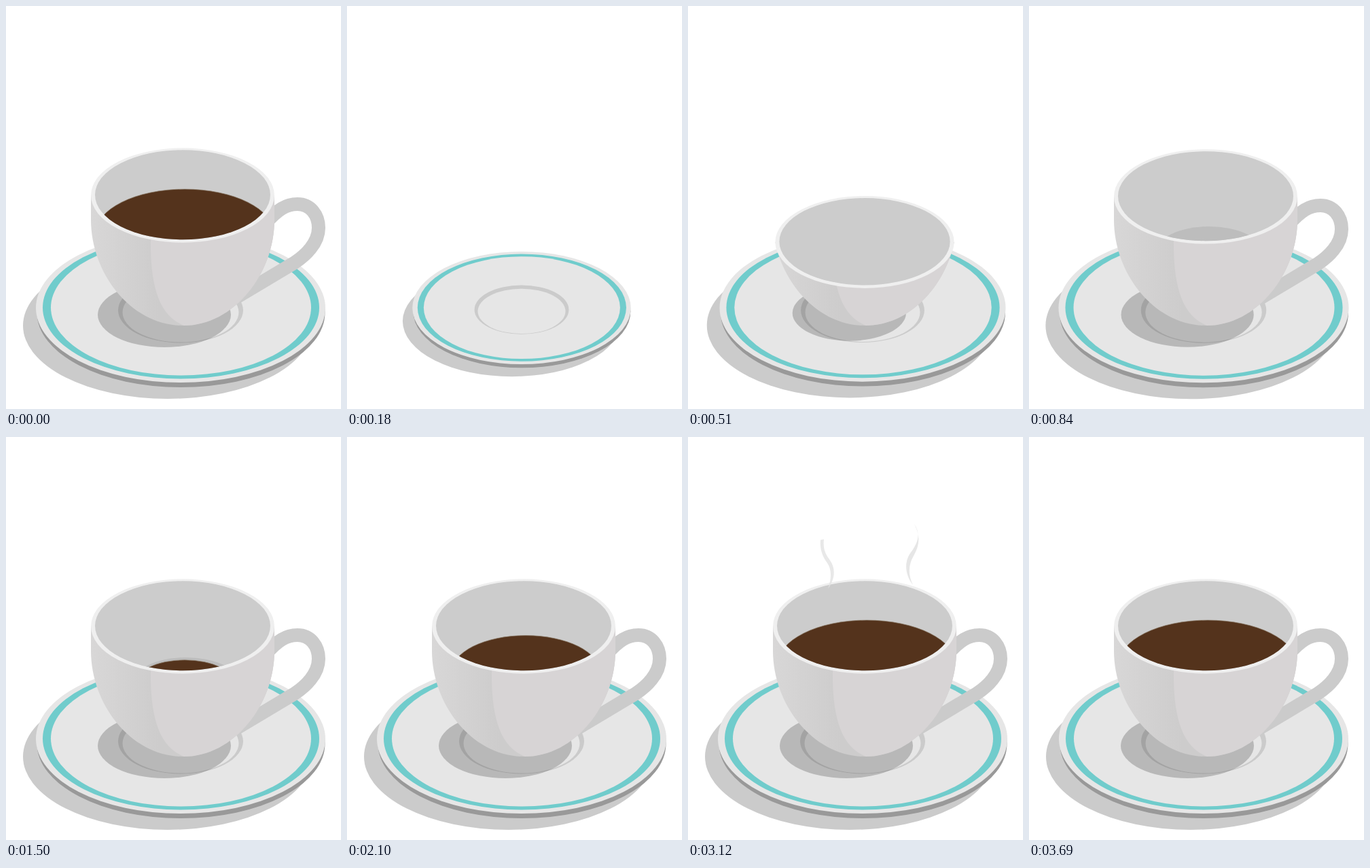
These frames come from a looping animation (493x594 px, 4290 ms). An HTML page:

```html
<!DOCTYPE html>
<html lang="en">
<head>
<meta charset="utf-8">
<title>Coffee cup</title>
<style>
html, body { margin: 0; width: 100%; height: 100%; overflow: hidden; background: #fff; }
svg { display: block; width: 100vw; height: 100vh; }
</style>
</head>
<body>
<svg viewBox="0 0 493 594">
  <defs>
    <linearGradient id="side" gradientUnits="userSpaceOnUse" x1="125" y1="0" x2="225" y2="0">
      <stop offset="0" stop-color="#d8d7d7"/>
      <stop offset="1" stop-color="#cdcccc"/>
    </linearGradient>
    <clipPath id="below"><rect id="cut" x="100" width="320" height="300"/></clipPath>
    <clipPath id="inside"><ellipse id="mouth" cx="260"/></clipPath>
    <clipPath id="wipe0"><rect x="160" width="220" height="200"/></clipPath>
    <clipPath id="wipe1"><rect x="160" width="220" height="200"/></clipPath>
    <clipPath id="wipe2"><rect x="160" width="220" height="200"/></clipPath>
  </defs>

  <g id="saucer">
    <ellipse cx="238" cy="471" rx="213" ry="108" fill="#cbcbcb"/>
    <ellipse cx="257.5" cy="452" rx="212" ry="110" fill="#999"/>
    <ellipse cx="257" cy="445" rx="213" ry="110" fill="#e6e6e6"/>
    <ellipse cx="257.5" cy="444.5" rx="203.5" ry="105" fill="#70cccc"/>
    <ellipse cx="257.5" cy="444.5" rx="191.5" ry="100" fill="#e6e6e6"/>
    <ellipse cx="257" cy="448.5" rx="92" ry="48" fill="#cbcbcb"/>
    <ellipse cx="257" cy="451.5" rx="85.5" ry="44" fill="#e6e6e6"/>
  </g>

  <g id="cup">
    <ellipse id="shade" fill="#000" fill-opacity=".2"/>
    <path id="handle" pathLength="1" fill="none" stroke="#cbcbcb" stroke-width="20"
      d="M340 429C375 408 405 390 425 378C440 368 460 350 460 327C460 308 448 292 429 292C412 292 400 300 382 320"/>
    <g clip-path="url(#below)">
      <path fill="url(#side)" d="M125 200V315C125 395 185 471 260 471C335 471 395 395 395 315V200Z"/>
      <path fill="#d7d4d5" d="M213 200V340C212 400 220 455 262 471C335 471 395 395 395 315V200Z"/>
    </g>
    <ellipse id="rim" cx="260" fill="#efefef"/>
    <ellipse id="inner" cx="260" fill="#ccc"/>
    <g clip-path="url(#inside)">
      <ellipse id="floor" cx="265" cy="365" rx="80" ry="40" fill="#bdbdbd"/>
      <ellipse id="coffee" cx="263" fill="#54331c" stroke="#85735f" stroke-width=".7"/>
    </g>
  </g>

  <g fill="#e3e3e3">
    <g class="steam"><path clip-path="url(#wipe0)" d="M259 90C242 118 251 132 260 145C270 160 269 182 262 202C277 182 279 162 266 142C257 128 252 114 259 90Z"/></g>
    <g class="steam"><path clip-path="url(#wipe1)" d="M333 145C343 160 338 172 330 184C318 198 318 218 331 235C323 218 325 204 332 192C340 178 343 164 333 145Z"/></g>
    <g class="steam"><path clip-path="url(#wipe2)" d="M195 177L200 176C198 192 204 200 209 207C218 220 216 235 206 249C212 232 211 220 205 211C197 200 194 190 195 177Z"/></g>
  </g>
</svg>
<script>
const LOOP = 4290, STEP = 30, SETTLED = 1020, BASE = 471;
const $ = id => document.getElementById(id);
const set = (el, attrs) => { for (const k in attrs) el.setAttribute(k, attrs[k]); };
const ramp = (t, from, to) => Math.min(1, Math.max(0, (t - from) / (to - from)));

// Straight rise to 1, then a decaying wobble around it.
function spring(t, from, to, amp, period) {
  if (t < to) return ramp(t, from, to);
  if (t >= SETTLED) return 1;
  const s = t - to;
  return 1 + amp * Math.sin(2 * Math.PI * s / period) * Math.exp(-s / 250);
}

const bezier = (a, b, c, d, p) => {
  const q = 1 - p;
  return a * q * q * q + 3 * b * q * q * p + 3 * c * q * p * p + d * p * p * p;
};

// Half width of the bowl at height y.
function radius(y) {
  if (y <= 315) return 135;
  let lo = 0, hi = 1;
  for (let i = 0; i < 24; i++) {
    const mid = (lo + hi) / 2;
    if (bezier(315, 395, BASE, BASE, mid) < y) lo = mid; else hi = mid;
  }
  return 260 - bezier(125, 125, 185, 260, lo);
}

function drawCup(t) {
  const u = spring(t, 403, 570, 0.091, 285);
  $('cup').style.display = u > 0 ? '' : 'none';
  if (u <= 0) return;
  const y = BASE - 192 * u;
  const rx = radius(y);
  const ry = Math.min(rx * 0.516, BASE - y);
  const hole = { cy: y - 0.7, rx: Math.max(0, rx - 6), ry: Math.max(0, ry - 3.7) };
  set($('cut'), { y });
  set($('rim'), { cy: y, rx, ry });
  set($('inner'), hole);
  set($('mouth'), hole);
  set($('shade'), { cx: 245 - 12 * u, cy: 448 + 7 * u, rx: 58 + 40 * u, ry: 29 + 19 * u });

  const grown = ramp(t, 570, 750);
  set($('handle'), {
    'stroke-dasharray': grown < 1 ? grown + ' 2' : 'none',
    opacity: grown > 0 ? 1 : 0,
    transform: `translate(0 ${y - 279})`
  });
  set($('floor'), { opacity: ramp(t, 570, 720) });

  const top = 270 + 75 * Math.pow(1 - ramp(t, 1260, 2640), 1.28);
  const w = 131 - (top - 270) * 0.95;
  set($('coffee'), { cy: top + w / 2, rx: w, ry: w / 2, opacity: t >= 1260 ? 1 : 0 });
}

const steams = [
  { top: 90, low: 202, on: 2270, full: 2600, fade: 2900, off: 3120, rise: 0.12, alpha: 1 },
  { top: 145, low: 235, on: 2370, full: 2660, fade: 3080, off: 3420, rise: 0.04, alpha: 1 },
  { top: 176, low: 249, on: 2430, full: 2700, fade: 3200, off: 3600, rise: 0.06, alpha: 0.8 }
];
const plumes = document.querySelectorAll('.steam');

function drawSteam(t) {
  steams.forEach((s, i) => {
    const shown = ramp(t, s.on, s.full);
    const alpha = shown > 0 ? s.alpha * (1 - ramp(t, s.fade, s.off)) : 0;
    set(plumes[i], { opacity: alpha, transform: `translate(0 ${(2700 - t) * s.rise})` });
    set($('wipe' + i).firstElementChild, { y: s.low - (s.low - s.top + 1) * shown });
  });
}

function draw(ms) {
  const now = Math.floor((ms % LOOP) / STEP) * STEP;
  const t = now < 60 ? LOOP : now;
  const size = spring(t, 60, 219, 0.134, 305);
  set($('saucer'), { transform: `translate(257 445) scale(${size}) translate(-257 -445)` });
  drawCup(t);
  drawSteam(t);
}

const start = performance.now();
function tick() {
  draw(performance.now() - start);
  requestAnimationFrame(tick);
}
tick();
</script>
</body>
</html>
```
